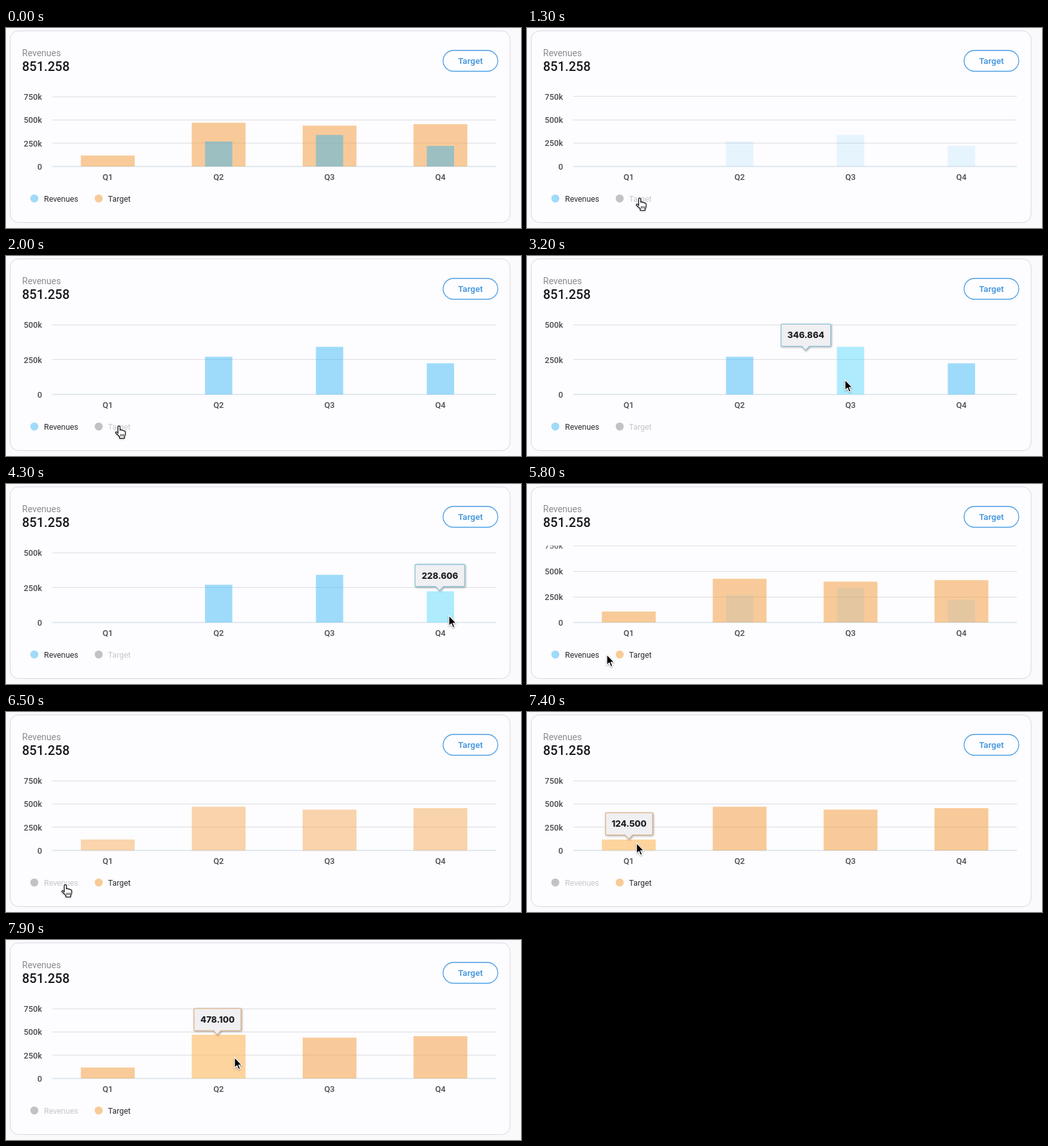
Recreate the animation shown at these times as an HTML page. Size 800x312 px, loop 8 s.

```html
<!DOCTYPE html>
<html lang="en">
<head>
<meta charset="utf-8">
<title>Quarterly revenues</title>
<style>
  html, body { margin: 0; width: 100%; height: 100%; overflow: hidden; background: #faf9fc; }
  svg { display: block; width: 800px; height: 312px; font-family: Roboto, Inter, sans-serif; }
  .axis { font-size: 12.8px; font-weight: 500; fill: #4b4b50; }
  .legend { font-size: 12.4px; }
  .tip-text { font: 800 13.3px Inter, Roboto, sans-serif; fill: #1f1f24; }
  #tip { filter: drop-shadow(1px 1px 1.5px rgba(0, 0, 0, .35)); }
  #cursor { filter: drop-shadow(0 1px 1px rgba(0, 0, 0, .35)); }
</style>
</head>
<body>
<svg id="stage" viewBox="0 0 800 312">
  <defs><clipPath id="chartClip"><rect y="96" width="800" height="216"/></clipPath></defs>
  <rect width="800" height="312" fill="#faf9fc"/>
  <rect x="6.5" y="4.5" width="776.5" height="299" rx="13" fill="#fdfcfe" stroke="#d8d7dd"/>
  <text x="25" y="43.5" font-size="14" fill="#8a8a90">Revenues</text>
  <text x="25" y="67" font-size="20" font-weight="500" fill="#17171c">851.258</text>
  <rect x="679" y="35" width="85" height="32.5" rx="16.25" fill="#fefdff" stroke="#4a9fe6" stroke-width="1.3"/>
  <text x="721.5" y="56" font-size="13.5" font-weight="500" fill="#3b92dc" text-anchor="middle">Target</text>
  <g id="chart" clip-path="url(#chartClip)"></g>
  <g id="legend" class="legend"></g>
  <g id="tip">
    <path id="tipBox" fill="#f5f4f7" fill-opacity=".94" stroke-width="1.3" stroke-linejoin="round"/>
    <text id="tipText" class="tip-text" x=".5" y="-18.8" text-anchor="middle"></text>
  </g>
  <g id="cursor" stroke-linejoin="round">
    <path id="arrow" d="M0 0V16.5L3.8 13L6.3 19L9 17.8L6.4 12H11.5Z" stroke="#fff" stroke-width="1.2"/>
    <g id="hand" transform="translate(-6 0)" fill="#fff" stroke="#111" stroke-width="1.2">
      <path d="M4.5 12V2a1.6 1.6 0 0 1 3.2 0V7q2-1.4 3 .5q2-1 2.8 .7q2.3-.6 2.5 1.6V13q-.2 2.5-1.6 4V19.5H7V17Q4 14 1 11.5q-.7-2 1.2-2Q3.5 10 4.5 12Z"/>
      <path d="M8.6 13v3.5M10.9 13v3.5M13.2 13v3.5" fill="none" stroke-width="1"/>
    </g>
  </g>
</svg>
<script>
const LOOP = 8000, BASE = 216, WIDE = 36.17, TALL = 54.25;
const HIDE_PLAN = 1270, SHOW_PLAN = 5450, HIDE_REVENUES = 6350;
const $ = id => document.getElementById(id);

function set(el, attrs) {
  for (const key in attrs) el.setAttribute(key, attrs[key]);
}
function add(parent, tag, attrs, text) {
  const el = document.createElementNS('http://www.w3.org/2000/svg', tag);
  set(el, attrs);
  if (text !== undefined) el.textContent = text;
  parent.appendChild(el);
  return el;
}

const ease = p => (1 - Math.cos(Math.PI * Math.min(1, Math.max(0, p)))) / 2;

// Each key is [time, value, value...]; values ease from key to key.
function track(keys, t) {
  if (t <= keys[0][0]) return keys[0].slice(1);
  const i = keys.findIndex(k => k[0] > t);
  if (i < 0) return keys[keys.length - 1].slice(1);
  const a = keys[i - 1], b = keys[i], p = ease((t - a[0]) / (b[0] - a[0]));
  return a.slice(1).map((v, n) => v + (b[n + 1] - v) * p);
}

const cursorKeys = [
  [150, 215, 285], [1000, 175, 265], [1980, 175, 265], [2600, 330, 192],
  [2780, 330, 192], [3200, 494, 193], [3600, 503, 196], [3660, 503, 196],
  [4050, 684, 204], [4300, 688, 205], [4500, 690, 204], [4560, 690, 204],
  [5200, 175, 265], [5600, 175, 265], [5800, 124, 266], [6300, 92, 269],
  [6520, 92, 269], [7100, 165, 205], [7360, 165, 205], [7750, 355, 183]
];
const scaleKeys = [
  [HIDE_PLAN, WIDE], [HIDE_PLAN + 500, TALL], [SHOW_PLAN, TALL], [SHOW_PLAN + 500, WIDE]
];

const plan = {
  name: 'Target', x: 144, textX: 158.5, half: 41.8, alpha: .5, tipHalf: 36,
  fill: 'rgb(243,154,54)', hover: 'rgb(253,174,62)', dot: '#f8cb96', border: '#dcb487',
  values: [124.5, 478.1, 447, 463],
  fade: [[5980, 1], [6080, .2], [HIDE_REVENUES, .2], [HIDE_REVENUES + 220, 1]],
  visible: t => t < HIDE_PLAN || t >= SHOW_PLAN
};
const revenues = {
  name: 'Revenues', x: 44, textX: 59, half: 21.2, alpha: .45, tipHalf: 38,
  fill: 'rgb(44,178,243)', hover: 'rgb(77,214,250)', dot: '#9fdaf9', border: '#8fc4da',
  values: [0, 275.788, 346.864, 228.606],
  fade: [[600, 1], [680, .2], [HIDE_PLAN, .2], [HIDE_PLAN + 220, 1],
         [SHOW_PLAN, 1], [SHOW_PLAN + 120, .2], [5790, .2], [5960, 1]],
  visible: t => t < HIDE_REVENUES
};
const series = [plan, revenues];

// Each stop is [time, quarter] where the pointer enters a bar.
const tipRuns = [
  { of: revenues, end: 5000, stops: [[2450, 1], [3130, 2], [3920, 3]] },
  { of: plan, end: LOOP, stops: [[6945, 0], [7560, 1]] }
];

const centre = q => 158.1 + 172.25 * q;
const barTop = (s, q, scale) => 217 - s.values[q] / 250 * scale;

const grid = [0, 1, 2, 3].map(k => ({
  k,
  line: add($('chart'), 'line', { x1: 72, x2: 761, stroke: k ? '#dcdbe0' : '#c3d6e6' }),
  label: add($('chart'), 'text', { x: 56, 'text-anchor': 'end', class: 'axis' }, k ? k * 250 + 'k' : '0')
}));
for (const s of series) {
  s.group = add($('chart'), 'g', {});
  s.bars = s.values.map((v, q) =>
    add(s.group, 'rect', { x: centre(q) - s.half, width: s.half * 2, 'fill-opacity': s.alpha }));
  s.mark = add($('legend'), 'circle', { cx: s.x, cy: 266, r: 6.2 });
  s.label = add($('legend'), 'text', { x: s.textX, y: 271 }, s.name);
}
for (let q = 0; q < 4; q++)
  add($('chart'), 'text', { x: centre(q), y: 237, 'text-anchor': 'middle', class: 'axis' }, 'Q' + (q + 1));

function drawGrid(scale) {
  for (const { k, line, label } of grid) {
    const y = BASE - k * scale;
    const row = Math.floor(y) + (k ? .5 : 0);
    const opacity = k === 3 ? 1 - (scale - WIDE) / (TALL - WIDE) : 1;
    set(line, { y1: row, y2: row, opacity });
    set(label, { y: y + 4.8, opacity });
  }
}

function drawSeries(s, t, scale, x, y) {
  const shown = s.visible(t);
  // The plan bars appear at their final height.
  const unit = s === plan ? WIDE : scale;
  set(s.group, { opacity: shown ? track(s.fade, t)[0] : 0 });
  s.bars.forEach((bar, q) => {
    const top = barTop(s, q, unit);
    const over = t >= 200 && Math.abs(x - centre(q)) < s.half && y > top && y < BASE;
    set(bar, { y: top, height: Math.max(0, BASE - top), fill: over ? s.hover : s.fill });
  });
  set(s.mark, { fill: shown ? s.dot : '#c2c1c5' });
  set(s.label, { fill: shown ? '#2b2b30' : '#c6c5ca' });
}

function drawTip(t, scale) {
  const run = tipRuns.find(r => t >= r.stops[0][0] && t < r.end + 150);
  set($('tip'), { visibility: run ? 'visible' : 'hidden' });
  if (!run) return;
  let pos, current;
  run.stops.forEach(([start, q], i) => {
    if (t < start) return;
    const goal = [centre(q), barTop(run.of, q, scale) - .7];
    const next = run.stops[i + 1];
    const left = Math.exp(-.0127 * (Math.min(t, next ? next[0] : LOOP) - start));
    pos = pos ? goal.map((g, n) => g + (pos[n] - g) * left) : goal;
    current = q;
  });
  const half = run.of.tipHalf;
  set($('tip'), {
    transform: `translate(${pos[0]} ${pos[1]})`,
    opacity: 1 - ease((t - run.end) / 150)
  });
  set($('tipBox'), {
    d: `M0 0L-6-6.5H${1 - half}q-1 0-1-1V-40q0-1 1-1H${half}q1 0 1 1V-7.5q0 1-1 1H6Z`,
    stroke: run.of.border
  });
  $('tipText').textContent = run.of.values[current].toFixed(3);
}

function drawCursor(t, x, y) {
  const onItem = y > 255 && y < 277 && ((x > 36 && x < 115) || (x > 137 && x < 195));
  set($('cursor'), { transform: `translate(${x} ${y})`, visibility: t < 200 ? 'hidden' : 'visible' });
  set($('arrow'), { display: onItem ? 'none' : 'inline' });
  set($('hand'), { display: onItem ? 'inline' : 'none' });
}

function draw(t) {
  const [scale] = track(scaleKeys, t);
  const [x, y] = track(cursorKeys, t);
  drawGrid(scale);
  for (const s of series) drawSeries(s, t, scale, x, y);
  drawTip(t, scale);
  drawCursor(t, x, y);
}

const started = performance.now();
function tick() {
  draw((performance.now() - started) % LOOP);
  requestAnimationFrame(tick);
}
draw(0);
requestAnimationFrame(tick);
</script>
</body>
</html>
```
